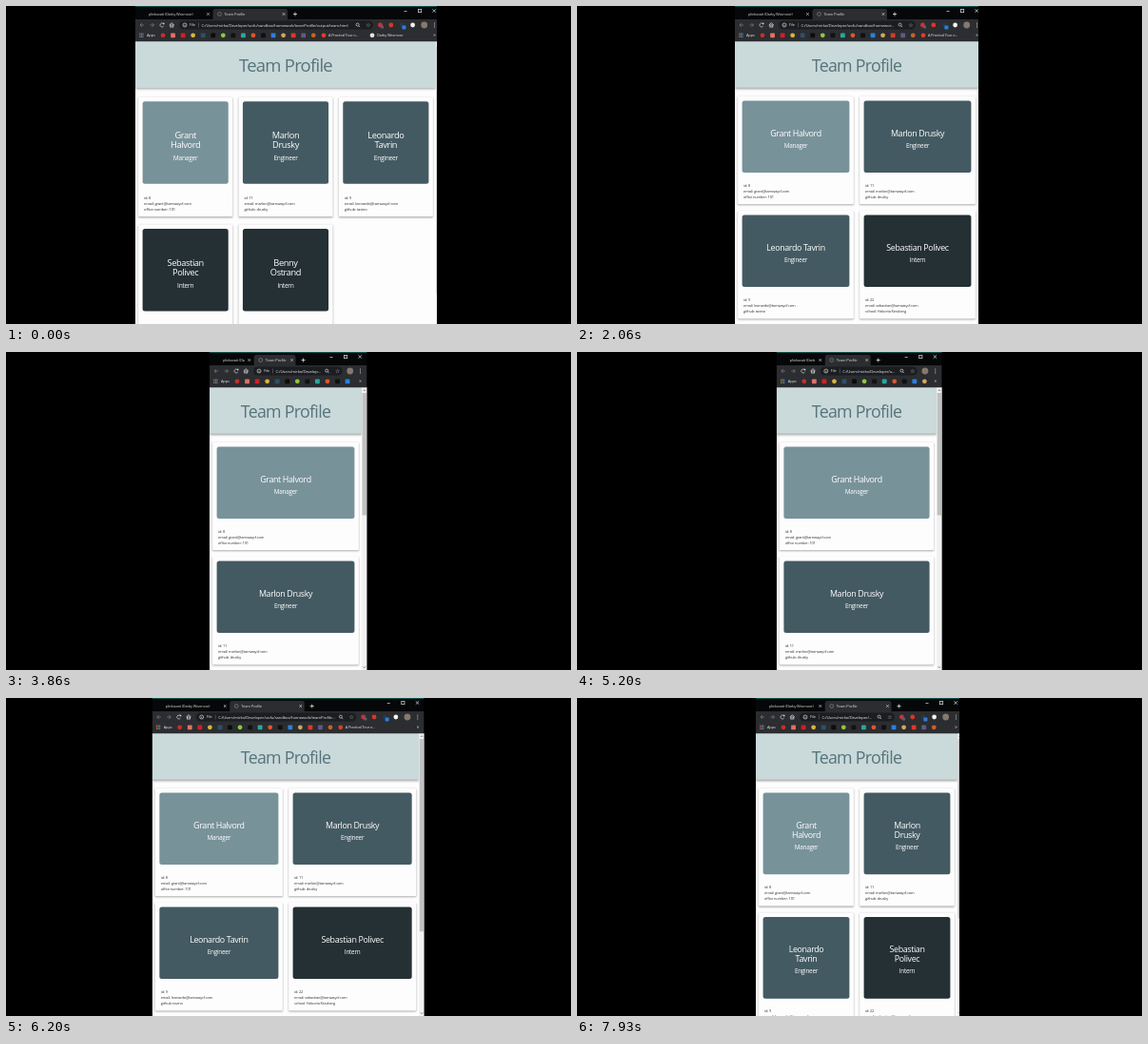
An HTML page with a canvas for the animation above (8 s loop, 594x334 px).

```html
<!DOCTYPE html>
<html lang="en">
<head>
<meta charset="utf-8">
<title>Team Profile</title>
<style>
html, body { margin: 0; width: 100%; height: 100%; overflow: hidden; background: #000; }
canvas { display: block; }
</style>
</head>
<body>
<canvas id="stage" width="594" height="334"></canvas>
<script>
const ctx = document.getElementById('stage').getContext('2d');
const LOOP = 8000, FPS = 15, CENTER = 294, BAR = 5.5;

// [tick, left edge, right edge] of the browser window
const keys = [
  [0, 136, 453], [1, 138, 450], [7, 144, 449], [16, 144, 449], [22, 150, 440], [28, 159, 430],
  [31, 166, 422], [40, 182, 410], [43, 186, 402], [47, 194, 397], [58, 214, 379.5], [77, 214, 379.5],
  [82, 193, 400], [84, 184, 410], [95, 147, 446], [97, 143, 451], [102, 133, 461], [105, 133, 460],
  [112, 154, 421], [115, 175, 408], [119, 188, 402]
];
// ticks at which the picture is refreshed
const beats = [0, 1, 3, 5, 7, 17, 18, 20, 22, 24, 26, 28, 30, 31, 33, 35, 36, 38, 40, 42, 43, 46, 47, 49,
  50, 51, 53, 54, 55, 57, 58, 78, 79, 81, 82, 84, 86, 87, 89, 90, 92, 93, 95, 97, 99, 101, 102, 105,
  107, 108, 110, 112, 114, 115, 117, 119];

const roleColor = { Manager: '#78929a', Engineer: '#445a62', Intern: '#243034' };
const team = [
  ['Grant Halvord', 'Manager', 8, 'grant', 'office number: 101'],
  ['Marlon Drusky', 'Engineer', 11, 'marlon', 'github: drusky'],
  ['Leonardo Tavrin', 'Engineer', 9, 'leonardo', 'github: tavino'],
  ['Sebastian Polivec', 'Intern', 22, 'sebastian', 'school: Halvoria Kessberg'],
  ['Benny Ostrand', 'Intern', 18, 'benny', 'school: Halvoria Kessberg']
];
const bookmarks = ['#c4302b', '#dd7268', '#d01f26', '#d9b53c', '#2f5068', '#0c0c0c', '#8fc741', '#121212',
  '#2aa79b', '#e0562c', '#101010', '#2b80d8', '#d0a860', '#d63a2c', '#5d5a86', '#c8622a'];
const links = [[198, '#d8402f', 'A Practical Tour o...'], [249, '#e4e4e4', 'Darby Wexmoor']];
const url = 'C:/Users/mirko/Developer/uofu/sandbox/homework/teamProfile/output/team.html';

function rect(x, y, w, h, color, radius = 0) {
  ctx.fillStyle = color;
  ctx.beginPath();
  ctx.roundRect(x, y, w, h, radius);
  ctx.fill();
}
const dot = (x, y, r, color) => rect(x - r, y - r, 2 * r, 2 * r, color, r);

function line(color, width, ...points) {
  ctx.strokeStyle = color;
  ctx.lineWidth = width;
  ctx.beginPath();
  points.forEach(([x, y], i) => i ? ctx.lineTo(x, y) : ctx.moveTo(x, y));
  ctx.stroke();
}

function ring(x, y, r, color, from = 0, to = 7) {
  ctx.strokeStyle = color;
  ctx.lineWidth = .7;
  ctx.beginPath();
  ctx.arc(x, y, r, from, to);
  ctx.stroke();
}

function cross(x, y, r, color) {
  line(color, .7, [x - r, y - r], [x + r, y + r]);
  line(color, .7, [x - r, y + r], [x + r, y - r]);
}

// y is the middle of the capitals; text wider than max is cut
function text(str, x, y, size, color, { align = 'left', max = 1e3, end = '' } = {}) {
  ctx.font = `${size}px "Open Sans", "Noto Sans", sans-serif`;
  ctx.letterSpacing = `${-.04 * size}px`;
  ctx.textAlign = align;
  ctx.fillStyle = color;
  if (ctx.measureText(str).width > max) {
    while (str && ctx.measureText(str + end).width > max) str = str.slice(0, -1);
    str += end;
  }
  ctx.fillText(str, x, y + .355 * size);
}

function withShadow(offset, blur, draw) {
  ctx.save();
  ctx.shadowColor = 'rgba(0,0,0,.4)';
  ctx.shadowOffsetY = offset;
  ctx.shadowBlur = blur;
  draw();
  ctx.restore();
}

function drawTabs(left, right) {
  const tab = Math.min(79.5, (right - left - 76) / 2), active = left + tab;
  rect(left, 0, right - left, 14, '#060708');
  rect(left, 0, right - left, 1, '#0d4f4a');
  rect(active + 2, 3, tab - 1, 12, '#2b2d30', [2.5, 2.5, 0, 0]);
  text('plinkovatt (Darby Wexmoor)', left + 14, 8.5, 3.9, '#d4d6d8', { max: tab - 21 });
  cross(active - 3, 8.5, 1.2, '#e2e2e2');
  ring(active + 9, 8.5, 1.9, '#85898d');
  text('Team Profile', active + 14, 8.5, 4.1, '#d8dadc');
  cross(active + tab - 3, 8.5, 1.2, '#e2e2e2');
  const plus = active + tab + 9;
  line('#e2e2e2', .8, [plus - 2, 8.5], [plus + 2, 8.5]);
  line('#e2e2e2', .8, [plus, 6.5], [plus, 10.5]);
  line('#ddd', .7, [right - 39, 5.5], [right - 36, 5.5]);
  ctx.strokeRect(right - 24, 3.5, 3.2, 3.2);
  cross(right - 7.3, 5, 1.7, '#e8e8e8');
}

function drawToolbar(left, right) {
  const y = 20, light = '#d6d8da', dim = '#75797d';
  rect(left, 14, right - left, 12, '#2b2d30');
  for (const [x, dir, color] of [[7, -1, dim], [17.5, 1, dim]]) {
    const cx = left + x;
    line(color, .8, [cx - 2, y], [cx + 2, y]);
    line(color, .8, [cx, y - 2], [cx + 2 * dir, y], [cx, y + 2]);
  }
  ring(left + 28, y, 2, light, .5, 5.6);
  rect(left + 29, y - 2.3, 1.5, 1.5, light);
  line(light, .8, [left + 35.7, y], [left + 38.3, y - 2.3], [left + 40.9, y]);
  ctx.strokeRect(left + 36.8, y, 3, 2);

  const count = Math.max(0, Math.min(4, Math.floor((right - left - 171) / 11.4)));
  const zoom = right - 42 - count * 11.4;
  rect(left + 46, 15.5, zoom + 16 - left - 46, 9, '#1b1d20', 4.5);
  ring(left + 52, y, 2, light);
  line(light, .7, [left + 52, y - .3], [left + 52, y + 1.2]);
  text('File', left + 57, y, 4.2, light);
  line(dim, .5, [left + 66.5, 17.5], [left + 66.5, 22.5]);
  text(url, left + 69.5, y, 4.3, '#e2e4e6', { max: zoom - 6 - left - 69.5, end: '...' });
  ring(zoom - .3, y - .4, 1.5, light);
  line(light, .7, [zoom + .8, y + .7], [zoom + 2.2, y + 2.1]);
  text('☆', zoom + 11, y, 6, light, { align: 'center' });

  const icons = ['#c8323a', '#d8362c', '#26384a', '#f2f2f2'].slice(0, count);
  icons.forEach((color, i) => {
    const x = right - 18.5 - (count - i) * 11.4;
    dot(x, y, 2.4, color);
    if (i === 0) rect(x + .6, y + .6, 3, 3, '#5a6066', .6);
    if (i === 2) rect(x + .2, y + .4, 4, 4, '#2a7fd6', .6);
  });
  dot(right - 17.8, y, 3.4, '#86786e');
  for (const d of [-2, 0, 2]) dot(right - 7, y + d, .55, light);
}

function drawBookmarks(left, right) {
  const y = 30.8, limit = right - 12;
  rect(left, 26, right - left, 11.3, '#2b2d30');
  for (let i = 0; i < 9; i++)
    rect(left + 4.2 + i % 3 * 1.6, y - 2.2 + Math.floor(i / 3) * 1.6, 1.1, 1.1, ['#d85a4a', '#5aa86a', '#5a8ad0'][i % 3]);
  text('Apps', left + 12, y, 4, '#e0e2e4');
  bookmarks.forEach((color, i) => {
    const x = left + 29 + i * 10.55;
    if (x + 5 <= limit) rect(x - 2.4, y - 2.4, 4.8, 4.8, color, i % 3 ? .8 : 2.4);
  });
  for (const [x, color, label] of links) {
    if (left + x + 45 > limit && left + x + 32 > limit) continue;
    dot(left + x, y, 2.4, color);
    text(label, left + x + 5, y, 3.9, '#e0e2e4');
  }
  text('»', right - 7, y - .5, 5, '#e0e2e4', { align: 'center' });
}

function drawCard([name, role, id, user, extra], x, y, w, m) {
  const mid = x + w / 2, top = y + 4.5, bottom = top + m.panel;
  withShadow(.8, 2, () => rect(x, y, w, m.card, '#fdfdfd', .7));
  rect(x + 4.5, top, w - 9, m.panel, roleColor[role], 2.5);
  const lines = m.split ? name.split(' ') : [name];
  lines.forEach((part, i) =>
    text(part, mid, top + 34 * m.scale + i * m.line, 8.9 * m.scale, '#fff', { align: 'center' }));
  text(role, mid, top + 34 * m.scale + lines.length * m.line + 2.7, 6.4 * m.scale, '#fff', { align: 'center' });
  [`id: ${id}`, `email: ${user}@tarnwaycf.com`, extra].forEach((row, i) =>
    text(row, x + 6, bottom + m.info + i * 6 * m.scale, 3.93 * m.scale, '#303436'));
}

function drawPage(left, right) {
  const edge = right - BAR, full = right - left;
  const cols = full >= 298 ? 3 : full >= 180 ? 2 : 1;
  const big = cols === 3, scale = big ? 1.036 : 1;
  const col = (edge - left) / cols, width = col - 6.2;
  const split = width - 9 < 104, line = 10.3 * scale;
  const panel = 65.2 + line * (split ? 2 : 1);
  const card = 4.5 + panel + 33.3 * scale;
  const m = { scale, split, line, panel, card, info: big ? 14.7 : 13.2 };
  const pitch = card + (big ? 8.2 : 6.8), top = big ? 95.8 : 95;

  rect(left, 37, full, 297, '#fdfdfd');
  team.forEach((person, i) =>
    drawCard(person, left + i % cols * col + 3.1, top + Math.floor(i / cols) * pitch, width, m));
  withShadow(1, 2.5, () => rect(left, 37.3, edge - left, 48.5 * (big ? 1.01 : 1), '#cad9d9'));
  text('Team Profile', CENTER, 62.3, 17.8 * scale, '#56747c', { align: 'center' });

  const height = Math.ceil(team.length / cols) * pitch + top - 37;
  rect(edge, 37.3, BAR, 297, '#f1f1f1');
  rect(edge + .5, 43, BAR - 1, 285 * 297 / height, '#c1c1c1');
  const x = edge + BAR / 2;
  line2(x, 40.3, -1);
  line2(x, 331, 1);
}

// scrollbar arrow
function line2(x, y, dir) {
  line('#606060', .8, [x - 1.2, y - .6 * dir], [x, y + .6 * dir], [x + 1.2, y - .6 * dir]);
}

function edgesAt(tick) {
  const beat = beats.findLast(b => b <= tick);
  const i = Math.max(1, keys.findIndex(k => k[0] >= beat));
  const [a, b] = [keys[i - 1], keys[i]], p = (beat - a[0]) / (b[0] - a[0]);
  return [1, 2].map(n => a[n] + (b[n] - a[n]) * p);
}

function frame() {
  const t = performance.now() % LOOP;
  const [left, clip] = edgesAt(Math.floor((t + 6.67) * FPS / 1000));
  const right = 2 * CENTER - left + BAR;
  ctx.fillStyle = '#000';
  ctx.fillRect(0, 0, 594, 334);
  ctx.save();
  ctx.beginPath();
  ctx.rect(left, 0, clip - left, 334);
  ctx.clip();
  drawPage(left, right);
  drawTabs(left, right);
  drawToolbar(left, right);
  drawBookmarks(left, right);
  ctx.restore();
  requestAnimationFrame(frame);
}
frame();
</script>
</body>
</html>
```
